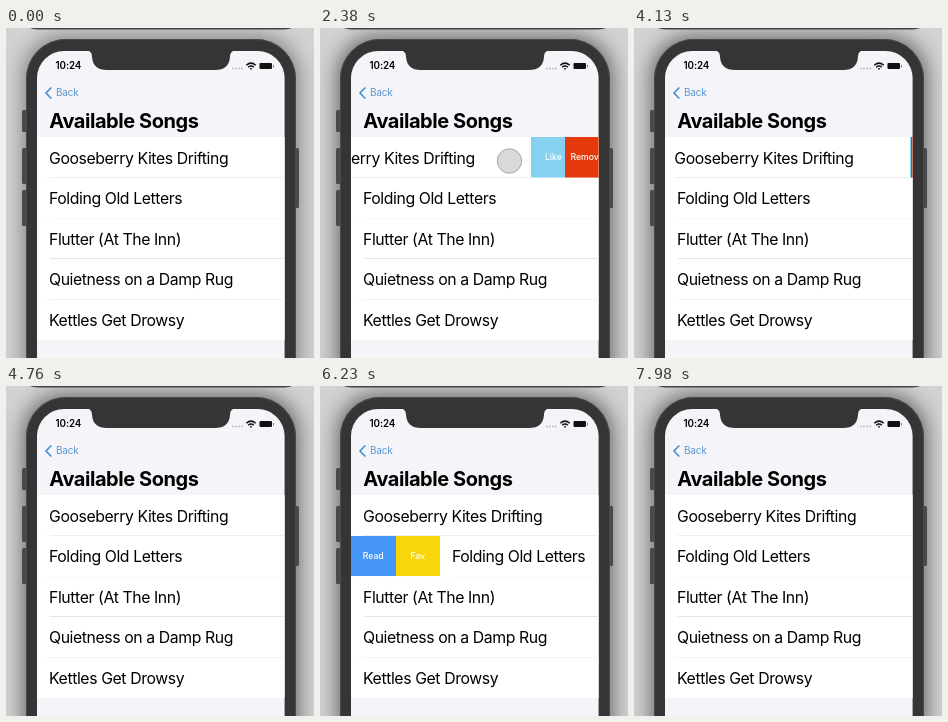
Animation of 308 by 330 pixels, one loop 8 s. Source, as an HTML page:

```html
<!DOCTYPE html>
<html lang="en">
<head>
<meta charset="utf-8">
<title>Swipe actions in a list</title>
<style>
  html, body { margin: 0; width: 100%; height: 100%; overflow: hidden; background: #cfcfcf; }
  svg { display: block; font-family: Inter, Roboto, sans-serif; }
  .row text { font-size: 15.8px; letter-spacing: -.4px; }
  .row path { stroke: #e0e0e3; shape-rendering: crispEdges; }
  .action rect { shape-rendering: crispEdges; }
  .action text { font-size: 8.7px; font-weight: 500; fill: #fff; text-anchor: middle; }
</style>
</head>
<body>
<svg width="308" height="330" viewBox="0 0 308 330">
  <defs>
    <clipPath id="screen"><rect x="31" y="23" width="247.6" height="340" rx="27"/></clipPath>
    <filter id="blur" x="-20%" y="-20%" width="140%" height="140%"><feGaussianBlur stdDeviation="10"/></filter>
  </defs>

  <rect width="308" height="330" fill="#d2d2d2"/>
  <rect id="shadow" x="17" y="8" width="276" height="370" rx="40" filter="url(#blur)"/>
  <path d="M24 0H286Q282 1.5 274 1.5H36Q28 1.5 24 0" fill="#444"/>

  <g fill="#4a4a4b">
    <rect x="16" y="82" width="6" height="22" rx="1.5"/>
    <rect x="16" y="120" width="6" height="36" rx="1.5"/>
    <rect x="16" y="162" width="6" height="36" rx="1.5"/>
    <rect x="287" y="120" width="6" height="60" rx="1.5"/>
  </g>
  <rect x="20" y="11" width="270" height="380" rx="40" fill="#353536"/>
  <rect x="20.5" y="11.5" width="269" height="380" rx="39.5" fill="none" stroke="#4a4a4b"/>

  <g clip-path="url(#screen)">
    <rect x="31" y="23" width="248" height="307" fill="#f5f4f9"/>
    <g id="list"></g>
    <path d="M80 22Q86 23 86 29Q87 42 101 42H209Q223 42 224 29Q224 23 230 22Z" fill="#353536"/>
    <circle id="touch" r="12.2" fill="#d9d9d9" stroke="#a6a6a6"/>
  </g>

  <text x="49.5" y="41.2" font-size="9.8" font-weight="600" letter-spacing="-.1">10:24</text>
  <path d="M226 40.5H237" stroke="#bbb" stroke-width="1.6" stroke-dasharray="1.8 1.2"/>
  <g fill="none" stroke="#111" stroke-width="1.5">
    <path d="M240.3 37.2Q245 33 249.7 37.2M242.2 39.2Q245 36.8 247.8 39.2"/>
    <path d="M244.2 40.8H245.8"/>
  </g>
  <rect x="253.5" y="35" width="12.5" height="6" rx="1" fill="#111"/>
  <path d="M267.5 37V39.4" stroke="#777"/>

  <path d="M45.3 59.5L40 65L45.3 70.5" fill="none" stroke="#3f8ed0" stroke-width="1.6"/>
  <text x="50" y="68.4" font-size="10" letter-spacing="-.2" fill="#5b98d0">Back</text>
  <text x="43.3" y="99.5" font-size="20" font-weight="700" letter-spacing="-.44">Available Songs</text>
</svg>

<script>
const LOOP = 8000, LEFT = 31, RIGHT = 278.6, TOP = 109, ROW = 40.6, OPEN = 89, BUTTON = OPEN / 2;
const songs = ["Gooseberry Kites Drifting", "Folding Old Letters", "Flutter (At The Inn)",
  "Quietness on a Damp Rug", "Kettles Get Drowsy"];
const $ = id => document.getElementById(id);

const action = (id, label, color) => `<g class="action" id="${id}">
  <rect width="${BUTTON}" height="${ROW}" fill="${color}"/>
  <text x="${BUTTON / 2}" y="23.3">${label}</text></g>`;

// Later buttons cover earlier ones, so each outer button comes last.
const actions = [
  action("like", "Like", "#87d1f0") + action("remove", "Remove", "#e4390b"),
  action("fav", "Fav", "#f9d50b") + action("read", "Read", "#4696f6")
];

$("list").innerHTML = songs.map((song, i) => `<g transform="translate(0 ${TOP + i * ROW})">
  <rect x="${LEFT}" width="248" height="${ROW}" fill="#fff"/>
  <g class="row" id="row${i}"><text x="43" y="26.5">${song}</text>
  ${i < 4 ? `<path d="M44 ${ROW}H279"/>` : ""}</g>${actions[i] || ""}</g>`).join("");

const progress = (t, start, length) => Math.min(1, Math.max(0, (t - start) / length));
const smooth = p => p * p * (3 - 2 * p);
const easeOut = p => 1 - (1 - p) ** 3;
const shiftX = (id, x) => $(id).setAttribute("transform", `translate(${x} 0)`);

const swipes = [
  { touch: 1820, close: 3780, x: 257, y: 133, dir: -1 },
  { touch: 5110, close: 7070, x: 55, y: 174, dir: 1 }
];
const drag = (s, t) => smooth(progress(t, s.touch + 180, 560));
const offset = (s, t) => OPEN * drag(s, t) * (1 - easeOut(progress(t, s.close, 510)));

function draw(t) {
  const [a, b] = swipes.map(s => offset(s, t));
  shiftX("row0", -a);
  shiftX("like", RIGHT - a);
  shiftX("remove", RIGHT - a / 2);
  shiftX("row1", b);
  shiftX("fav", LEFT + b - BUTTON);
  shiftX("read", LEFT + b / 2 - BUTTON);

  const s = t < 4000 ? swipes[0] : swipes[1];
  const touch = $("touch");
  touch.setAttribute("cx", s.x + s.dir * OPEN * drag(s, t));
  touch.setAttribute("cy", s.y);
  touch.setAttribute("opacity", t < s.touch ? 0 : 1 - progress(t, s.touch + 740, 140));
  $("shadow").setAttribute("opacity", t < swipes[0].touch ? .38 : .5);
}

function tick() {
  draw(performance.now() % LOOP);
  requestAnimationFrame(tick);
}
tick();
</script>
</body>
</html>
```
